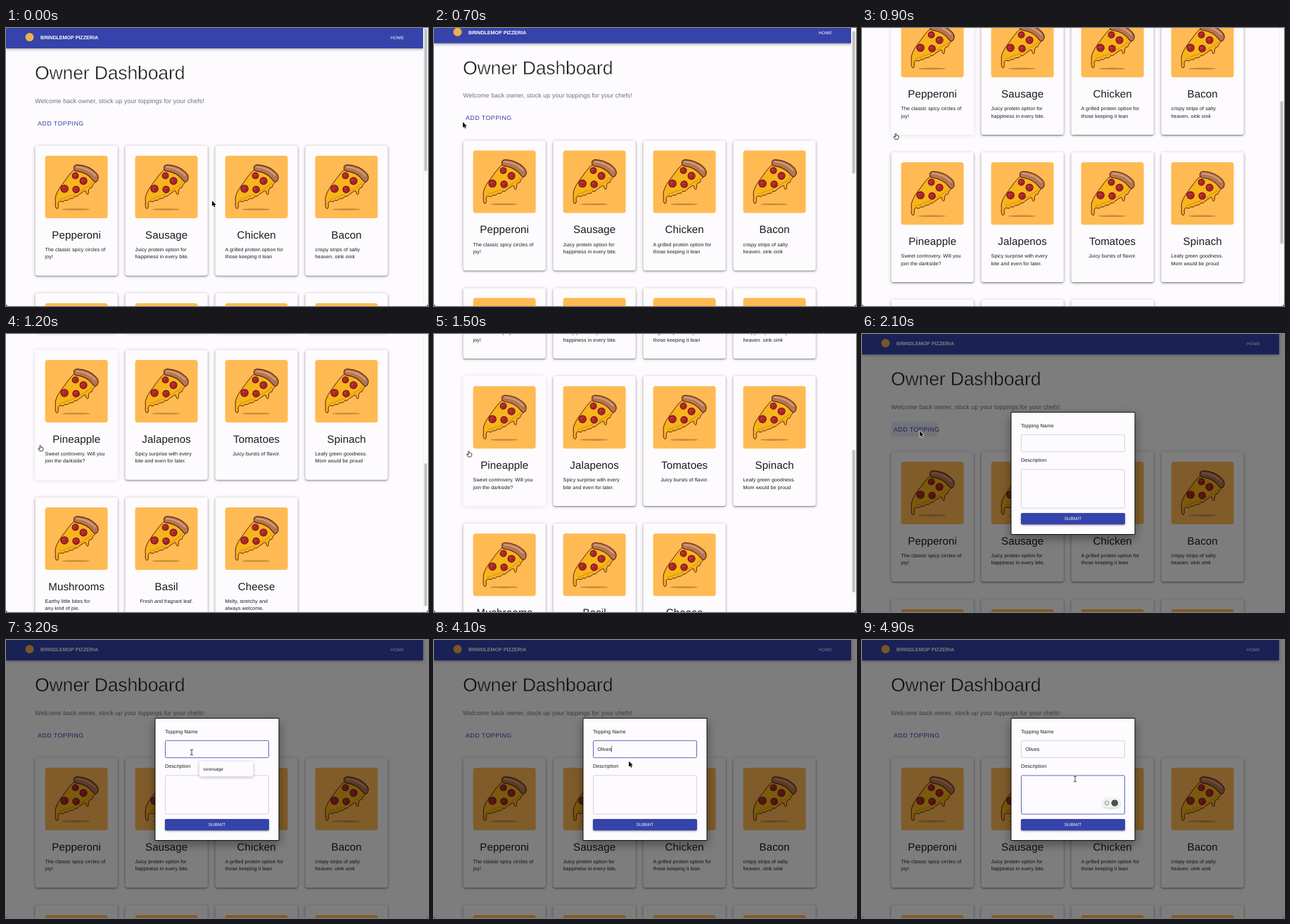
These frames come from a looping animation (600x396 px, 5000 ms). An HTML page with a canvas:

```html
<!DOCTYPE html>
<html lang="en">
<head>
<meta charset="utf-8">
<title>Owner Dashboard</title>
<style>
  html, body { margin: 0; width: 100%; height: 100%; overflow: hidden; background: #fdfbfe; }
  canvas { display: block; width: 600px; height: 396px; }
</style>
</head>
<body>
<canvas id="stage"></canvas>
<script>
const W = 600, H = 396, LOOP = 5000, STEP = 100;
const BLUE = '#3543aa', PAPER = '#fdfbfe', INK = '#1b1b1d';
const SANS = '"Liberation Sans", Arial, sans-serif';

const canvas = document.getElementById('stage');
const ratio = window.devicePixelRatio || 1;
canvas.width = W * ratio;
canvas.height = H * ratio;
const ctx = canvas.getContext('2d');

const toppings = [
  ['Pepperoni', 'The classic spicy circles of', 'joy!'],
  ['Sausage', 'Juicy protein option for', 'happiness in every bite.'],
  ['Chicken', 'A grilled protein option for', 'those keeping it lean'],
  ['Bacon', 'crispy strips of salty', 'heaven. oink oink'],
  ['Pineapple', 'Sweet controvery. Will you', 'join the darkside?'],
  ['Jalapenos', 'Spicy surprise with every', 'bite and even for later.'],
  ['Tomatoes', 'Juicy bursts of flavor.'],
  ['Spinach', 'Leafy green goodness.', 'Mom would be proud'],
  ['Mushrooms', 'Earthy little bites for', 'any kind of pie.'],
  ['Basil', 'Fresh and fragrant leaf.'],
  ['Cheese', 'Melty, stretchy and', 'always welcome.']
];

// Each key: time, then values
const scrollKeys = [[600, 0], [700, 7.3], [800, 95], [900, 200.6], [1000, 275], [1100, 325],
  [1200, 355], [1300, 367], [1400, 360], [1500, 317.7], [1600, 200], [1700, 80], [1800, 12], [1900, 0]];
const pointerKeys = [[100, 293, 246], [400, 150, 178], [600, 43, 136], [700, 41, 134], [900, 48, 150],
  [1500, 49.5, 166.5], [1700, 54, 160], [1900, 82, 138], [2400, 82, 138], [2700, 264, 160],
  [4000, 264, 160], [4300, 303, 198]];
const OPEN = 1950, NAME_FOCUS = 2690, DESC_FOCUS = 4350, WIDGET = 4880;
const keyTimes = [3450, 3600, 3700, 3800, 3950, 4050];

function sample(keys, t) {
  if (t <= keys[0][0]) return keys[0].slice(1);
  for (let i = 1; i < keys.length; i++) {
    const a = keys[i - 1], b = keys[i];
    if (t <= b[0]) {
      const k = (t - a[0]) / (b[0] - a[0]);
      return a.slice(1).map((v, j) => v + (b[j + 1] - v) * k);
    }
  }
  return keys[keys.length - 1].slice(1);
}

const inside = (x, y, [bx, by, bw, bh]) => x > bx && x < bx + bw && y > by && y < by + bh;

function text(str, x, y, size, { color = INK, weight = 400, align = 'left', gap = 0 } = {}) {
  ctx.font = `${weight} ${size}px ${SANS}`;
  ctx.letterSpacing = gap + 'px';
  ctx.textAlign = align;
  ctx.fillStyle = color;
  ctx.fillText(str, x, y);
}

function box(x, y, w, h, r, fill, stroke, line = 0.7) {
  ctx.beginPath();
  ctx.roundRect(x, y, w, h, r);
  if (fill) { ctx.fillStyle = fill; ctx.fill(); }
  if (stroke) { ctx.strokeStyle = stroke; ctx.lineWidth = line; ctx.stroke(); }
}

function shadow(alpha, blur, dy, draw) {
  ctx.save();
  ctx.shadowColor = `rgba(0,0,0,${alpha})`;
  ctx.shadowBlur = blur * ratio;
  ctx.shadowOffsetY = dy * ratio;
  draw();
  ctx.restore();
}

function dot(x, y, r, fill, stroke, line = 0.9) {
  ctx.beginPath();
  ctx.arc(x, y, r, 0, 7);
  ctx.fillStyle = fill;
  ctx.fill();
  if (stroke) { ctx.strokeStyle = stroke; ctx.lineWidth = line; ctx.stroke(); }
}

function shape(path, fill, stroke, line) {
  ctx.lineJoin = ctx.lineCap = 'round';
  if (fill) { ctx.fillStyle = fill; ctx.fill(path); }
  if (stroke) { ctx.strokeStyle = stroke; ctx.lineWidth = line; ctx.stroke(path); }
}

const cheese = new Path2D('M43 19Q38 22 33 29L22 44Q15 54 14.5 61Q15 66 14.5 71Q15 76 17.5 75.5Q19.5 74 18.5 69' +
  'Q19 64 22 65Q26 67 28 63.5Q32 65 35 61Q40 62 42 58Q46 59 48 55.5L56 50Q58 49 58.5 53' +
  'Q60 57.5 61.5 54Q61 48 64 45.5Q67 47 67.5 42L73 36Q60 22 43 19Z');
const melt = new Path2D('M21 62Q28 61 33 57.5Q39 57 44 53Q52 50 57 46Q63 43 67 38');
const crust = new Path2D('M41 19Q40 13 46 13Q62 14 72 24Q78 30 74 36Q71 39 68 35Q60 24 45 22Q42 22 41 19Z');
const shine = new Path2D('M45 16Q61 17 71 28');
const arrow = new Path2D('M0 0V8L1.9 6.3L3.2 9.2L4.5 8.6L3.2 5.9H5.8Z');
const hand = new Path2D('M-.8 .8Q0 -.7 .8 .8L.9 3.2Q3 2.8 4.2 4V6L3 8.5H-.9L-3 5.2Q-2.7 4 -1.5 4.8L-.8 5.4Z');
const beam = new Path2D('M-1.7 -3.8Q0 -3.8 0 -3Q0 -3.8 1.7 -3.8M0 -3V3M-1.7 3.8Q0 3.8 0 3Q0 3.8 1.7 3.8');

function pizza(x, y) {
  const line = '#5a2218';
  ctx.save();
  ctx.translate(x, y);
  box(0, 0, 89, 89, 3.5, '#ffba53');
  ctx.beginPath();
  ctx.ellipse(44, 76.5, 20, 1.2, 0, 0, 7);
  ctx.fillStyle = '#c58636';
  ctx.fill();
  shape(cheese, '#f8b41c', line, 1);
  shape(melt, null, '#e2930f', 1.2);
  for (const [px, py, r] of [[43, 28.5, 4.4], [54.5, 36, 5], [27.5, 47, 5.2], [44, 48, 4.7]]) {
    dot(px, py, r, '#b5262b', '#64131a', 1.1);
    dot(px - 1.6, py - 1.3, 0.9, '#d84c45');
    dot(px + 1.6, py + 1.4, 0.8, '#7f141d');
  }
  shape(crust, '#b57650', line, 1.1);
  shape(shine, null, '#d7a07a', 2);
  ctx.restore();
}

const cardBox = i => [41.5 + (i % 4) * 128, 167.7 + Math.floor(i / 4) * 210, 117.3, 185];

function card(i, hover) {
  const [x, y, w, h] = cardBox(i);
  const [name, ...lines] = toppings[i];
  const base = () => box(x, y, w, h, 3.2, PAPER);
  if (hover) shadow(0.12, 7, 0.5, base);
  else {
    shadow(0.22, 5, 0.8, base);
    shadow(0.4, 2, 1.1, base);
  }
  pizza(x + 14.1, y + 14.2);
  text(name, x + w / 2, y + 131.9, 15.1, { align: 'center', gap: 0.1 });
  const single = lines.length === 1;
  lines.forEach((s, n) => text(s, single ? x + w / 2 : x + 14.1, y + 150.2 + n * 10.4, 7.11,
    { align: single ? 'center' : 'left', gap: 0.067 }));
}

const addButton = [41.5, 125, 66, 21.5];

function page(scroll, buttonHover, cardHover) {
  ctx.fillStyle = PAPER;
  ctx.fillRect(0, 0, W, H);
  ctx.save();
  ctx.translate(0, -scroll);
  shadow(0.4, 4, 1.2, () => {
    ctx.fillStyle = BLUE;
    ctx.fillRect(0, -10, 593, 39);
  });
  dot(33.5, 13, 6, '#efb04a');
  text('BRINDLEMOP PIZZERIA', 49, 16.3, 7.11, { color: '#fff', weight: 700 });
  text('HOME', 546.7, 16, 6.22, { color: '#fff', gap: 0.17 });

  // A paper-coloured outline thins the heading to a light weight
  text('Owner Dashboard', 41, 73, 26.7, { gap: -0.22 });
  ctx.strokeStyle = PAPER;
  ctx.lineWidth = 0.5;
  ctx.strokeText('Owner Dashboard', 41, 73);
  text('Welcome back owner, stock up your toppings for your chefs!', 41.3, 106.6, 8.88, { color: '#707074', gap: 0.067 });
  if (buttonHover) box(...addButton, 2, 'rgba(53,67,170,.1)');
  text('ADD TOPPING', 45, 138.7, 8.9, { color: BLUE, gap: 0.44 });
  toppings.forEach((_, i) => card(i, i === cardHover));
  ctx.restore();
}

function scrollbar(scroll) {
  ctx.fillStyle = '#fafafa';
  ctx.fillRect(593, 0, 7, H);
  ctx.fillStyle = '#e9e9ea';
  ctx.fillRect(593, 0, 0.5, H);
  box(594.7, 0.5 + scroll * 0.517, 4.1, 203.5, 2, '#c1c1c2');
}

function caret(x, y, since) {
  if (since < 0 || since % 1000 >= 500) return;
  ctx.fillStyle = INK;
  ctx.fillRect(x, y, 0.6, 9);
}

const nameField = [226.5, 143.3, 147, 24.4];
const descField = [226.5, 193, 147, 55];

function field(rect, focused, hover) {
  const color = focused ? BLUE : hover ? '#333' : '#c3c2c5';
  box(...rect, 1.8, null, color, focused ? 0.8 : 0.7);
}

function dialog(t, px, py) {
  ctx.fillStyle = `rgba(0,0,0,${0.5 * Math.min(1, (t - OPEN) / 125)})`;
  ctx.fillRect(0, 0, W, H);
  shadow(0.4, 14, 5, () => box(212, 111.5, 176, 174, 0, PAPER));
  box(212, 111.5, 176, 174, 0, null, '#000', 0.9);

  const body = { gap: 0.067 };
  const onName = t >= NAME_FOCUS && t < DESC_FOCUS;
  const onDesc = t >= DESC_FOCUS;
  text('Topping Name', 226, 132.6, 7.11, body);
  field(nameField, onName, inside(px, py, nameField));
  text('Description', 226, 182.4, 7.11, body);
  field(descField, onDesc, inside(px, py, descField));

  const typed = 'Olives'.slice(0, keyTimes.filter(k => t >= k).length);
  text(typed, 232.2, 157.8, 7.11, body);
  if (onName) {
    const last = typed ? keyTimes[typed.length - 1] : NAME_FOCUS;
    caret(232.2 + ctx.measureText(typed).width, 150.8, t - last);
  }
  if (onDesc) caret(232.2, 199, t - DESC_FOCUS);

  shadow(0.4, 2.5, 1, () => box(226, 255, 148, 16.3, 1.8, BLUE));
  text('SUBMIT', 300, 265.3, 6.22, { color: '#fff', align: 'center', gap: 0.17 });

  if (onName && !typed) {
    shadow(0.3, 4, 1, () => box(274.8, 173, 76.7, 21.5, 2.2, PAPER));
    text('sooosage', 280.5, 186, 6.4, { gap: 0.08 });
  }
  if (t >= WIDGET) {
    shadow(0.25, 3, 0.7, () => box(342, 225.7, 25, 13, 6.5, '#f3f3f3'));
    dot(348.2, 232.2, 3.2, '#deded9', '#8b8d89', 0.7);
    dot(359.3, 232.2, 4.8, '#46544f');
  }
}

function pointer(kind, x, y) {
  ctx.save();
  ctx.translate(x, y);
  if (kind === 'beam') {
    shape(beam, null, '#fff', 1.6);
    shape(beam, null, '#111', 0.8);
  } else if (kind === 'hand') {
    shape(hand, '#fff', '#111', 0.8);
  } else {
    shape(arrow, null, '#fff', 1.3);
    shape(arrow, '#000');
  }
  ctx.restore();
}

function corners() {
  ctx.fillStyle = '#4c4c50';
  ctx.beginPath();
  ctx.moveTo(0, H - 4);
  ctx.quadraticCurveTo(0, H, 4, H);
  ctx.lineTo(0, H);
  ctx.moveTo(W, H - 4);
  ctx.quadraticCurveTo(W, H, W - 4, H);
  ctx.lineTo(W, H);
  ctx.fill();
}

function render(t) {
  ctx.setTransform(ratio, 0, 0, ratio, 0, 0);
  ctx.textRendering = 'geometricPrecision';
  const [scroll] = sample(scrollKeys, t);
  const [px, py] = sample(pointerKeys, t);
  const open = t >= OPEN;
  const buttonHover = t < 2500 && inside(px, py + scroll, addButton);
  const cardHover = open ? -1 : toppings.findIndex((_, i) => inside(px, py + scroll, cardBox(i)));

  page(scroll, buttonHover, cardHover);
  if (open) dialog(t, px, py);
  else scrollbar(scroll);
  corners();

  let kind = 'arrow';
  if (open) {
    if (inside(px, py, nameField) || inside(px, py, descField)) kind = 'beam';
  } else if (buttonHover || cardHover >= 0) kind = 'hand';
  const typing = t >= keyTimes[0] && t < 4100;
  if (!typing) pointer(kind, px, py);
}

const start = performance.now();
function tick() {
  const t = (performance.now() - start + 15) % LOOP;
  render(Math.floor(t / STEP) * STEP);
  requestAnimationFrame(tick);
}
tick();
</script>
</body>
</html>
```
